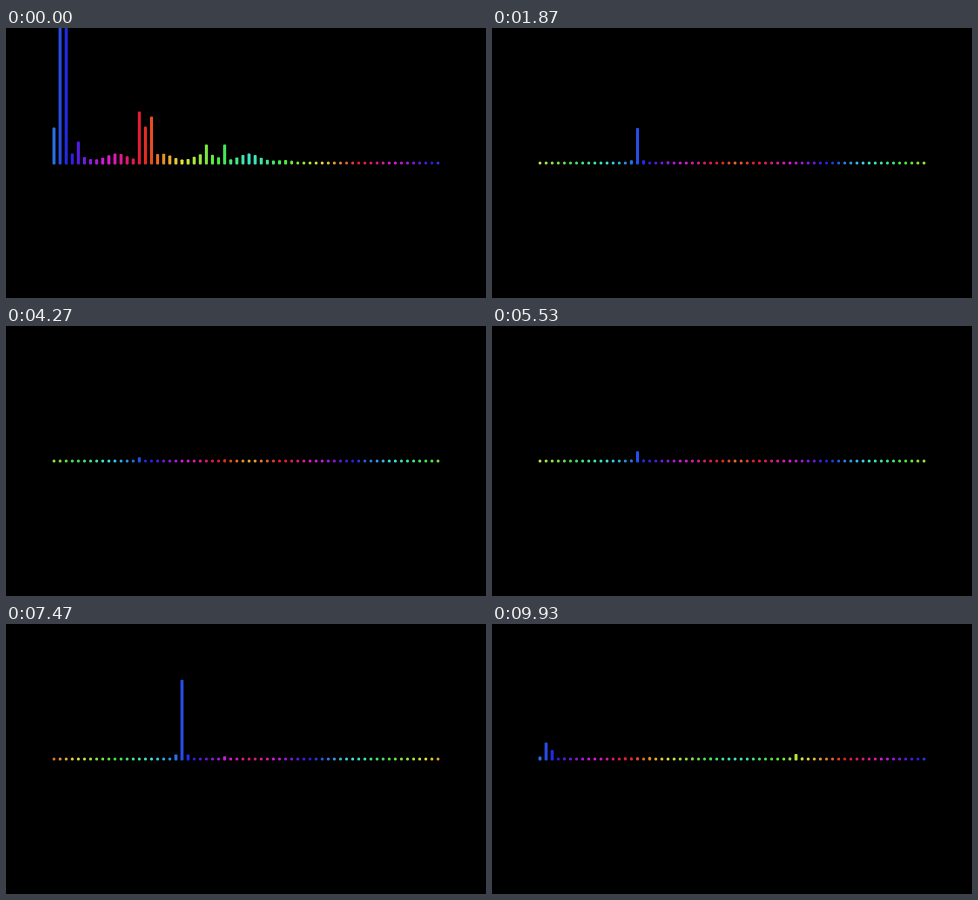
An HTML page with a canvas that plays this animation: 480 by 270 pixels, repeating every 9.99 s.

```html
<!DOCTYPE html>
<html lang="en">
<head>
<meta charset="utf-8">
<title>Spectrum</title>
<style>
  html, body { margin: 0; width: 100%; height: 100%; overflow: hidden; background: #000; }
  canvas { display: block; width: 480px; height: 270px; filter: blur(0.4px); }
</style>
</head>
<body>
<canvas id="stage" width="480" height="270"></canvas>
<script>
const ctx = document.getElementById('stage').getContext('2d');
const LOOP = 9990, BARS = 64, BASE = 136.5, REST = 3, MIDDLE = 32.3;
const KICK_EVERY = 3000, NOTE_EVERY = 825, DECAY = 265;

// Strongest bands of a kick: band -> level above rest
const peaks = { 0: 34, 1: 500, 2: 250, 4: 20, 14: 50, 15: 35, 16: 45, 25: 17, 28: 17 };

// One [band, level] per note
const melody = [
  [21, 22], [16, 77], [18, 44], [28, 20], [14, 4], [16, 74],
  [21, 20], [28, 33], [21, 92], [16, 37], [18, 20], [42, 4]
];

const clamp = v => Math.max(0, Math.min(1, v));

// Bands between the peaks form a ripple that fades out to the right
const ripple = i => (5 + 3 * Math.cos(2 * Math.PI * (i - 3) / 7.3)) * clamp((40 - i) / 8);

function kickLevel(i, age) {
  const fade = Math.exp(-age / (i < 3 ? DECAY : 200));
  return (peaks[i] ?? ripple(i)) * fade * clamp((1200 - age) / 200);
}

function levelsAt(t) {
  const levels = Array.from({ length: BARS }, (_, i) => kickLevel(i, t % KICK_EVERY));
  melody.forEach(([band, level], n) => {
    const age = t - (n + 1) * NOTE_EVERY;
    if (age < 0) return;
    const v = level * Math.exp(-age / DECAY);
    levels[band] += v;
    levels[band - 1] += v * 0.04;
    levels[band + 1] += v * 0.04;
  });
  return levels;
}

// The loudest band is blue; hues climb to the middle and mirror back
function colour(i, loudest) {
  const hue = 227 + 9.7 * (MIDDLE - loudest - Math.abs(i - MIDDLE));
  const light = 54 - 5 * Math.cos((hue - 300) * Math.PI / 180);
  return `hsl(${hue} 80% ${light}%)`;
}

function draw(t) {
  const levels = levelsAt(t);
  const loudest = levels.indexOf(Math.max(...levels));
  ctx.fillStyle = '#000';
  ctx.fillRect(0, 0, 480, 270);
  levels.forEach((level, i) => {
    const h = REST + level;
    ctx.fillStyle = colour(i, loudest);
    ctx.beginPath();
    ctx.roundRect(46.5 + i * 384 / (BARS - 1), BASE - h, 3, h, level < 1 ? 1.5 : 0.9);
    ctx.fill();
  });
}

const began = performance.now();
function tick() {
  const t = (performance.now() - began) % LOOP;
  const step = Math.min(149, Math.floor((t + 3.4) * 15 / 1000));
  draw(Math.round(step * 20 / 3) * 10);
  requestAnimationFrame(tick);
}
tick();
</script>
</body>
</html>
```
